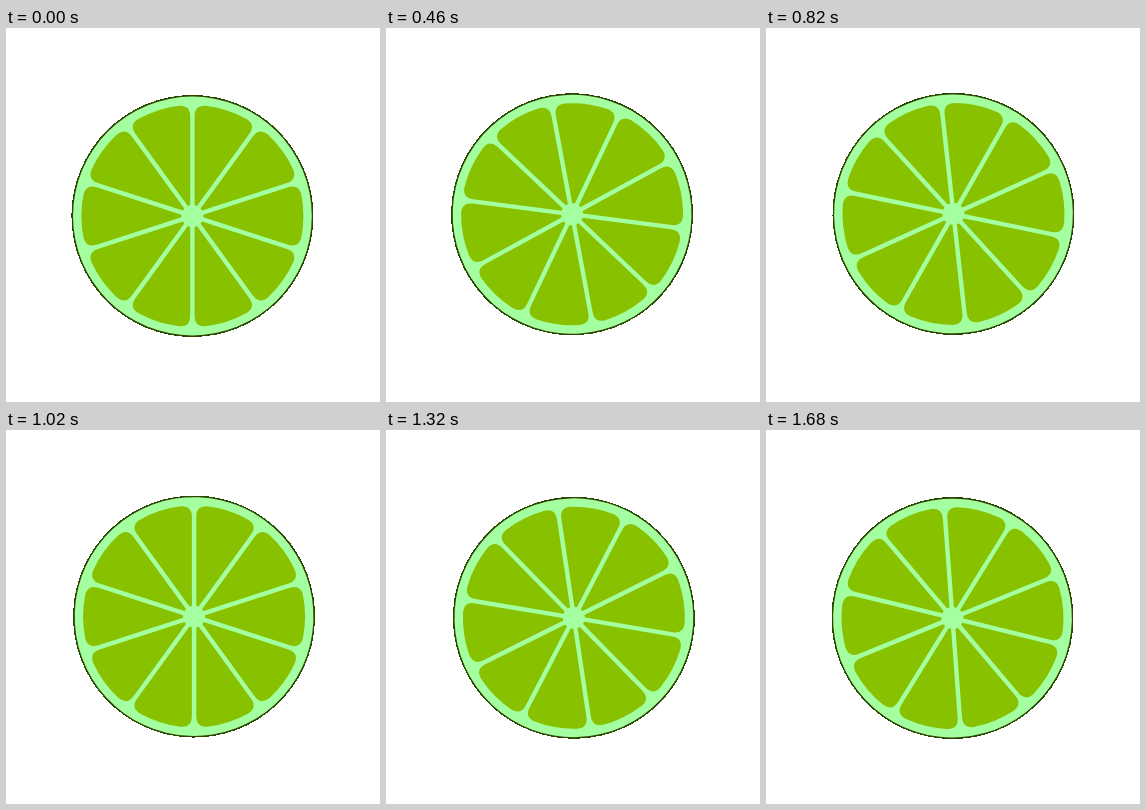
An HTML page for the animation above (1.7 s loop, 374 px wide and 374 px high).

```html
<!DOCTYPE html>
<html lang="en">
<head>
<meta charset="utf-8">
<title>Spinning lime slice</title>
<style>
  html, body { margin: 0; width: 100%; height: 100%; overflow: hidden; background: #fff; }
  svg { display: block; width: 100vw; height: 100vh; }
</style>
</head>
<body>
<svg viewBox="0 0 374 374">
  <g id="slice">
    <circle r="121" fill="#2c4500" shape-rendering="crispEdges"/>
    <circle r="119.4" fill="#a3ff9f"/>
    <g id="segments" fill="#88c100"></g>
    <circle r="11" fill="#a3ff9f"/>
  </g>
</svg>
<script>
const LOOP = 1700, STEP = 20, COUNT = 10;
const PIVOT = 187, OFFSET = [-0.6, 1];
const RADIUS = 111, HALF_GAP = 2.2, ROUNDING = 11;

const slice = document.getElementById('slice');
const segments = document.getElementById('segments');

// One wedge pointing up, with its two outer corners rounded.
function segmentPath() {
  const half = Math.PI / COUNT;
  const point = (radius, side, inset = 0) => {
    const angle = half - Math.asin(HALF_GAP / radius) - inset;
    return `${side * radius * Math.sin(angle)} ${-radius * Math.cos(angle)}`;
  };
  const inset = ROUNDING / RADIUS;
  return `M0 ${-HALF_GAP / Math.sin(half)}
    L${point(RADIUS - ROUNDING, -1)}
    Q${point(RADIUS, -1)} ${point(RADIUS, -1, inset)}
    A${RADIUS} ${RADIUS} 0 0 1 ${point(RADIUS, 1, inset)}
    Q${point(RADIUS, 1)} ${point(RADIUS - ROUNDING, 1)}Z`;
}

const shape = segmentPath();
for (let i = 0; i < COUNT; i++) {
  const path = document.createElementNS('http://www.w3.org/2000/svg', 'path');
  path.setAttribute('d', shape);
  path.setAttribute('transform', `rotate(${(i + 0.5) * 360 / COUNT})`);
  segments.append(path);
}

// The slice sits slightly off its pivot, so it wobbles as it turns.
function draw(time) {
  const tick = Math.floor((time % LOOP) / STEP) * STEP;
  const angle = 360 * tick / LOOP;
  slice.setAttribute('transform',
    `translate(${PIVOT} ${PIVOT}) rotate(${angle}) translate(${OFFSET})`);
}

let start;
function frame(now) {
  start ??= now;
  draw(now - start);
  requestAnimationFrame(frame);
}
draw(0);
requestAnimationFrame(frame);
</script>
</body>
</html>
```
